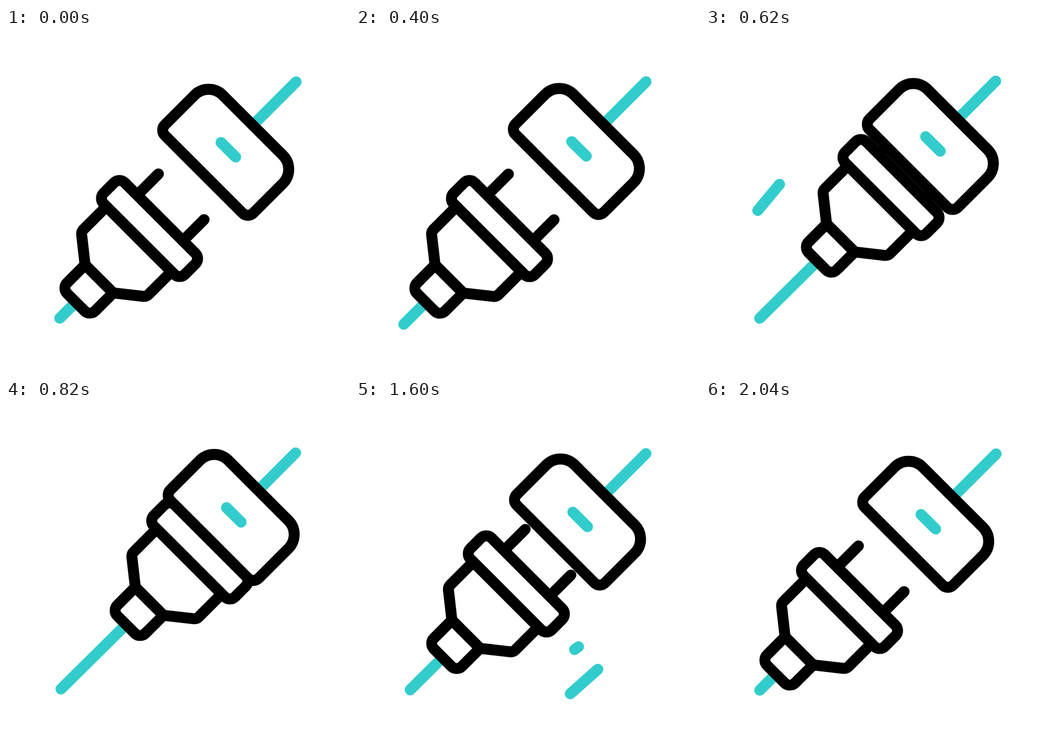
Write an HTML page that moves like this. It is 640 px wide and 640 px high and loops after 3020 ms.

```html
<!DOCTYPE html>
<html lang="en">
<head>
<meta charset="utf-8">
<title>Plug and socket</title>
<style>
  html, body { margin: 0; width: 100%; height: 100%; overflow: hidden; background: #fff; }
  svg { display: block; width: 100%; height: 100%; }
  path, line { stroke: #000; stroke-width: 20.4; stroke-linecap: round; stroke-linejoin: round; fill: none; }
  .solid { fill: #fff; }
  .teal { stroke: #33cccc; }
</style>
</head>
<body>
<svg viewBox="0 0 640 640">
  <g id="cables"></g>
  <g id="plug"></g>
  <g id="socket"></g>
  <g id="sparks"></g>
</svg>
<script>
const LOOP = 3020, STEP = 20;
const byId = id => document.getElementById(id);

function add(parent, tag, attrs) {
  const el = document.createElementNS('http://www.w3.org/2000/svg', tag);
  for (const k in attrs) el.setAttribute(k, attrs[k]);
  return byId(parent).appendChild(el);
}

function setLine(el, [x1, y1], [x2, y2]) {
  el.setAttribute('x1', x1);
  el.setAttribute('y1', y1);
  el.setAttribute('x2', x2);
  el.setAttribute('y2', y2);
}

function addLine(parent, a, b, cls = '') {
  const el = add(parent, 'line', { class: cls });
  setLine(el, a, b);
  return el;
}

// Everything is symmetric about the diagonal x + y = 640.
const mirror = ([x, y, r]) => [640 - y, 640 - x, r];
const mirrored = half => [...half, ...half.map(mirror).reverse()];

// Closed polygon of [x, y, radius] corners.
function roundPoly(pts) {
  const n = pts.length;
  return pts.map((p, i) => corner(pts[(i + n - 1) % n], p, pts[(i + 1) % n], i ? 'L' : 'M')).join('') + 'Z';
}

function corner(prev, p, next, cmd) {
  const [x, y, r] = p;
  if (!r) return `${cmd}${x} ${y}`;
  const toward = q => {
    const d = Math.hypot(q[0] - x, q[1] - y);
    return [(q[0] - x) / d, (q[1] - y) / d];
  };
  const u = toward(prev), v = toward(next);
  const angle = Math.acos(u[0] * v[0] + u[1] * v[1]);
  const d = r / Math.tan(angle / 2);
  const sweep = u[0] * v[1] - u[1] * v[0] < 0 ? 1 : 0;
  return `${cmd}${x + u[0] * d} ${y + u[1] * d}A${r} ${r} 0 0 ${sweep} ${x + v[0] * d} ${y + v[1] * d}`;
}

const addShape = (parent, half) =>
  add(parent, 'path', { class: 'solid', d: roundPoly(mirrored(half)) });

// Plug: prongs, body, flange, cable grip
const prong = [[283.5, 271.5], [245, 310]];
addLine('plug', ...prong);
addLine('plug', ...prong.map(mirror));
addShape('plug', [[147.1, 440.6, 0], [140.1, 378.9, 12], [186.9, 332.1, 0]]);
addShape('plug', [[171.8, 317, 14], [211, 277.8, 14]]);
addShape('plug', [[103.8, 484, 14], [147.1, 440.6, 0]]);

// Socket
addShape('socket', [[285.7, 190, 14], [377, 98.7, 37]]);
addLine('socket', [400, 213], [427.3, 240], 'teal');

const plugCable = add('cables', 'line', { class: 'teal' });
const socketCable = add('cables', 'line', { class: 'teal' });

const sparks = [
  { from: [95, 341], to: [150, 275], head: [470, 690], tail: [600, 820] },
  { from: [450, 501], to: [389, 555], head: [1450, 1650], tail: [1610, 1810] },
  { from: [414, 459], to: [358, 499], head: [1550, 1770], tail: [1700, 1900] }
].map(s => ({ ...s, el: add('sparks', 'line', { class: 'teal' }) }));

const mix = (a, b, k) => a.map((v, i) => v + (b[i] - v) * k);
const shift = (a, b) => [a[0] + b[0], a[1] + b[1]];
const span = (t, [a, b]) => Math.min(1, Math.max(0, (t - a) / (b - a)));
const smooth = u => u * u * (3 - 2 * u);

// Cubic timing curve with flat ends: handles (x1, 0) and (x2, 1).
const curve = (x1, x2) => u => {
  let lo = 0, hi = 1;
  for (let i = 0; i < 30; i++) {
    const s = (lo + hi) / 2, q = 1 - s;
    if (3 * q * q * s * x1 + 3 * q * s * s * x2 + s * s * s < u) lo = s;
    else hi = s;
  }
  return smooth(lo);
};
const push = curve(0.5, 0.35), pull = curve(0.25, 0.08);

// Offsets of each part: at rest, wound back, connected
const poses = {
  plug: [[0, 0], [-13.1, 13.1], [93.5, -92.3]],
  socket: [[0, 0], [0, 0], [10.2, -12.8]],
  plugEnd: [[100, 540], [86.9, 553.1], [102.3, 537.7]],
  socketEnd: [[539.8, 100.2], [539.8, 100.2], [538.8, 98.4]]
};

function pose(name, t) {
  const [rest, back, joined] = poses[name];
  if (t < 260) return mix(rest, back, smooth(t / 260));
  if (t < 1380) return mix(back, joined, push(span(t, [260, 820])));
  return mix(joined, rest, pull(span(t, [1380, 2040])));
}

function draw(t) {
  const plug = pose('plug', t), socket = pose('socket', t);
  byId('plug').setAttribute('transform', `translate(${plug})`);
  byId('socket').setAttribute('transform', `translate(${socket})`);
  setLine(plugCable, pose('plugEnd', t), shift([130, 510], plug));
  setLine(socketCable, pose('socketEnd', t), shift([459, 181], socket));

  for (const s of sparks) {
    const head = smooth(span(t, s.head)), tail = smooth(span(t, s.tail));
    s.el.style.display = head > tail ? '' : 'none';
    setLine(s.el, mix(s.from, s.to, tail), mix(s.from, s.to, head));
  }
}

const start = performance.now();
function tick() {
  const t = (performance.now() - start) % LOOP;
  draw(Math.floor(t / STEP) * STEP);
  requestAnimationFrame(tick);
}
tick();
</script>
</body>
</html>
```
